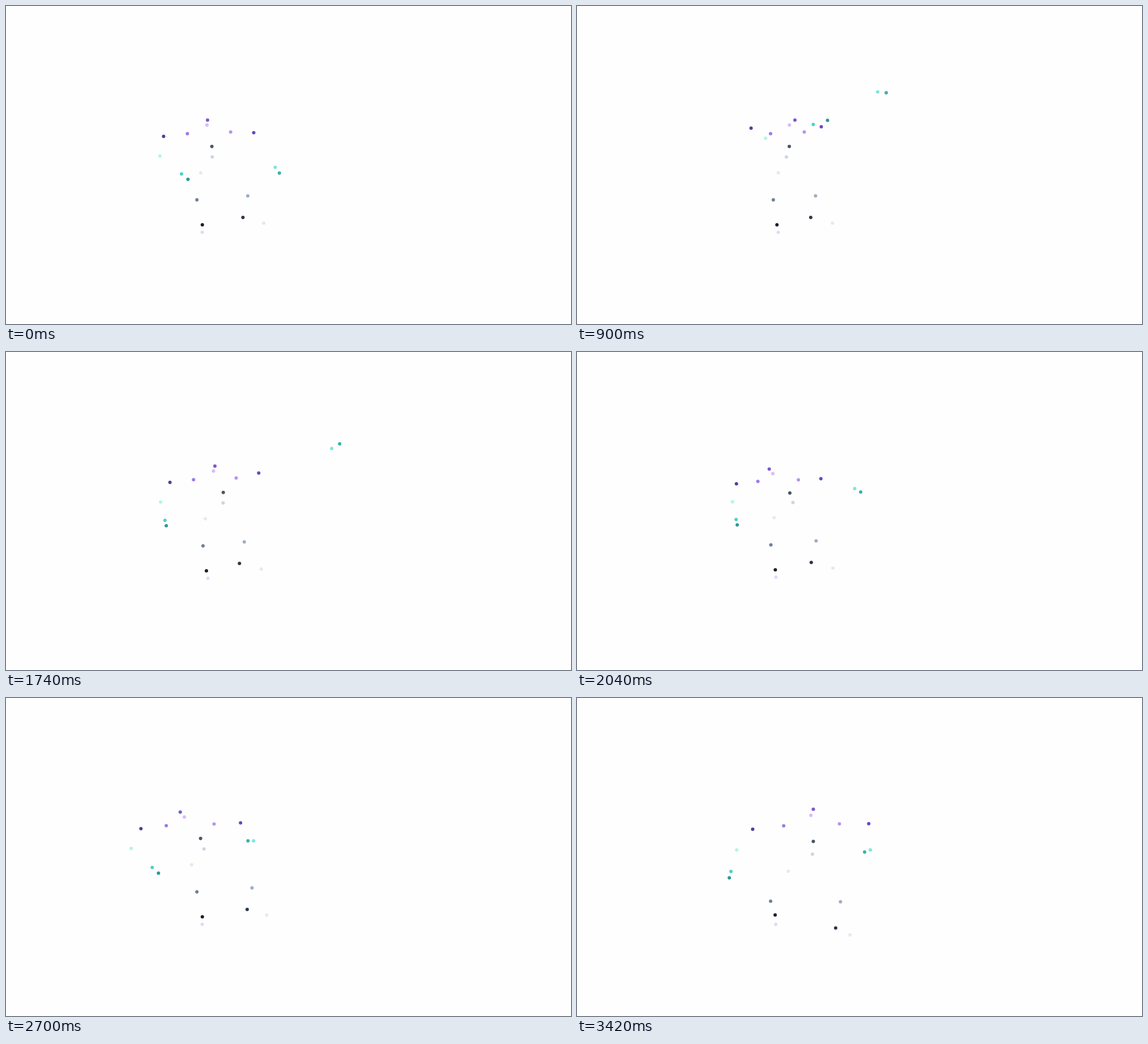
Recreate the animation shown at these times as an HTML page with a canvas. Size 998 by 561 pixels, loop 3450 ms.

```html
<!DOCTYPE html>
<html lang="en">
<head>
<meta charset="utf-8">
<title>Motion capture dots</title>
<style>
html, body { margin: 0; width: 100%; height: 100%; overflow: hidden; background: #fefefe; }
canvas { display: block; }
</style>
</head>
<body>
<canvas id="stage" width="998" height="561"></canvas>
<script>
const LOOP = 3450, STEP = 30, RADIUS = 3;
const ctx = document.getElementById('stage').getContext('2d');

const mix = (a, b, u) => a + (b - a) * u;

function ease(from, to, t) {
  const u = Math.min(Math.max((t - from) / (to - from), 0), 1);
  return u * u * (3 - 2 * u);
}

// Smooth curve through a few key values, without overshoot
function curve(times, v) {
  const rate = i => (v[i + 1] - v[i]) / (times[i + 1] - times[i]);
  const last = v.length - 1;
  const slope = i => {
    if (i === 0) return rate(0);
    if (i === last) return rate(last - 1);
    const a = rate(i - 1), b = rate(i);
    return a * b > 0 ? 2 * a * b / (a + b) : 0;
  };
  return t => {
    let i = 0;
    while (i < last - 1 && t >= times[i + 1]) i++;
    const span = times[i + 1] - times[i];
    const u = (t - times[i]) / span, w = 1 - u;
    return v[i] * w * w * (1 + 2 * u) + v[i + 1] * u * u * (3 - 2 * u)
      + span * u * w * (w * slope(i) - u * slope(i + 1));
  };
}

const body = (...v) => curve([0, 510, 1260, 1740, 2370, 2700, 3420], v);
const arm = (...v) => curve([0, 510, 850, 1260, 1500, 1740, 2160, 2370, 2700, 3420], v);

// Trunk and legs
const neckX = body(358, 366, 371, 368, 338, 326.3, 412.8);
const halfWidth = body(79.6, 72.6, 55.5, 78.4, 70.2, 88, 102.5);
const look = body(-2, 0, 28, 1, -28, -18.5, 4.6);
const chestX = body(363.6, 370.6, 378.8, 383.8, 360, 343.7, 417.4);
const hipX = body(344, 352.4, 356.8, 352, 342.1, 327.8, 373.2);
const sway = body(-4, 3, 4.5, 5, -5, -4, 0);
const footX = body(418.5, 415.2, 411.7, 412.4, 416.8, 426, 456.9);

// Arms
const elbowX = arm(271.8, 303.6, 336, 265.7, 266, 273.1, 275, 275.7, 221.1, 282.1);
const leftX = arm(321.4, 340.6, 446, 358.4, 355, 283.1, 283, 282.9, 269.3, 269);
const leftY = arm(305.8, 305.8, 200, 244.8, 245, 306.6, 304, 302.2, 309, 317.3);
const rightX = arm(482.9, 484.8, 544, 555.1, 558, 589.4, 460, 415.4, 427.4, 508);
const rightY = arm(294.7, 294.4, 150, 224.7, 217, 162.1, 281, 306.5, 252, 271.7);
const wristTurn = arm(-126, -137, -170, -197, -200, -210, -120, -77, 0, -20);

function dot(color, x, y) {
  ctx.fillStyle = color;
  ctx.beginPath();
  ctx.arc(x, y, RADIUS, 0, Math.PI * 2);
  ctx.fill();
}

function drawFigure(t) {
  const neck = neckX(t), half = halfWidth(t), turn = look(t);
  const chest = chestX(t), lean = sway(t), foot = footX(t);
  const bow = ease(1740, 2370, t) * (1 - ease(2370, 2700, t));
  const near = ease(2700, 3420, t);

  // Bowing lowers the upper body; stepping closer enlarges the figure
  const bowed = y => y + bow * Math.max(-4, (258 - y) * 0.2);
  const level = (y, growth = 0.22) => bowed(y) + near * growth * (y - 224);

  const lx = leftX(t), ly = leftY(t), rx = rightX(t), ry = rightY(t);
  const shoulderX = neck + half;
  const shoulderY = bowed(223.2 + (ry - 290) * 0.075);

  // Head and shoulders
  dot('#d6bcfa', neck - 2 + turn / 2, level(210));
  dot('#7c58d0', neck + turn, level(201.3));
  dot('#553c9a', neck - half, bowed(230 + (ly - 306) * 0.14));
  dot('#9f7aea', neck - half * 0.47 + turn * 0.1, level(225.3));
  dot('#b794f4', neck + half * 0.49 + turn * 0.1, level(222.3));
  dot('#6b46c1', shoulderX, shoulderY);

  // Spine
  dot('#4a5568', chest, level(247.7));
  dot('#cfd4e1', chest - turn * 0.33, level(266.2));
  dot('#e8e7f3', hipX(t), level(294.2, 0.16));

  // Left leg stays planted, right leg steps
  dot('#718096', 342 + lean * 1.2, level(342, 0.14));
  dot('#e3d9fa', 351 + lean * 1.1, level(399.2, 0));
  dot('#1a202c', 350 + lean * 0.8, level(386, -0.02));
  dot('#a0aec0', foot + 8.5, level(335));
  dot('#2d3748', foot, level(373));
  dot('#e8e8f1', mix(foot, 431, 0.3) + 33, level(383));

  // Left arm
  const ex = elbowX(t), ey = 264.5 + (ly - 306) * 0.3;
  dot('#b2f5ea', ex, ey);
  dot('#4fd1c5', mix(lx, ex, 0.23), mix(ly, ey, 0.23));
  dot('#319795', lx, ly);

  // Right hand, with the wrist turning around it
  const angle = wristTurn(t) * Math.PI / 180;
  const wrist = 8 + Math.hypot(rx - shoulderX, ry - shoulderY) * 0.055;
  dot('#81e6d9', rx + Math.cos(angle) * wrist, ry + Math.sin(angle) * wrist);
  dot('#38b2ac', rx, ry);
}

function draw() {
  const t = Math.floor((performance.now() % LOOP) / STEP) * STEP;
  ctx.fillStyle = '#fefefe';
  ctx.fillRect(0, 0, 998, 561);
  drawFigure(t);
  requestAnimationFrame(draw);
}
draw();
</script>
</body>
</html>
```
